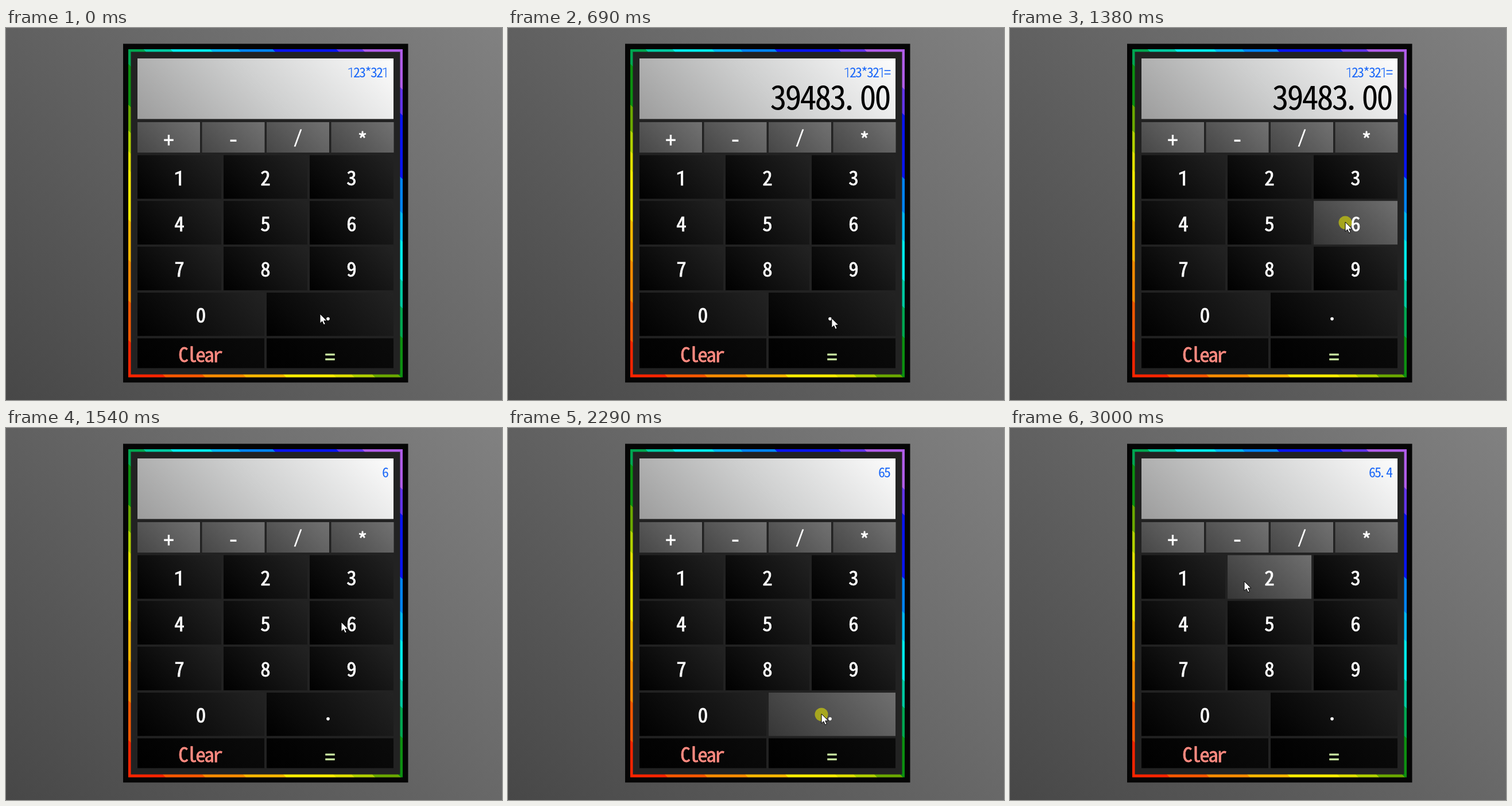
Animation, 864 px wide and 648 px high, one loop 3.06 s. Source, as an HTML page with a canvas:

```html
<!DOCTYPE html>
<html lang="en">
<head>
<meta charset="utf-8">
<title>Calculator</title>
<style>
  html, body { margin: 0; width: 100%; height: 100%; overflow: hidden; background: #666; }
  canvas { display: block; }
</style>
</head>
<body>
<canvas id="stage" width="864" height="648"></canvas>
<script>
const ctx = document.getElementById('stage').getContext('2d');
const LOOP = 3060, STEP = 76.4, LAST = 39;

const MONO = '"Noto Sans Mono CJK JP", "Noto Sans CJK JP", "Noto Sans Mono", monospace';
const PLAIN = 'Roboto, "Liberation Sans", sans-serif'; // has a 1 without a foot

const RAINBOW = [
  [0, '#ff2400'], [.062, '#ff5800'], [.128, '#ff8c00'], [.195, '#ffb800'],
  [.262, '#ffee00'], [.345, '#e0e000'], [.375, '#b0d000'], [.41, '#6aa800'],
  [.453, '#0c8f10'], [.52, '#00a550'], [.57, '#00c8a0'], [.615, '#00ecec'],
  [.68, '#00b8ff'], [.727, '#0084ff'], [.784, '#0814ff'], [.89, '#6234ea'],
  [.933, '#b05ce8']
];

// Keys: label, box, label centre offset from the box centre, font size, kind
const keys = [];
const addKey = (label, x, y, w, h, kind, dx = 0, dy = 2, size = 35) =>
  keys.push({ label, x, y, w, h, kind, dx, dy, size });

[['+', 5, 35], ['-', 5.5, 35], ['/', 1.5, 30], ['*', -4.5, 35]].forEach(([label, dy, size], i) =>
  addKey(label, 229 + i * 112.5, 164, 109, 53, 'op', 0, dy, size));
for (let i = 0; i < 9; i++)
  addKey(String(i + 1), 229 + i % 3 * 150, 221.5 + Math.floor(i / 3) * 79.7, 146, 76, 'digit');
addKey('0', 229, 461, 221, 75.5, 'digit');
addKey('.', 454, 461, 221, 75.5, 'digit', -3.5, 8);
addKey('Clear', 229, 540.5, 221, 52, 'clear');
addKey('=', 454, 540.5, 221, 52, 'equals', 0, 6.5);

const SHADES = {
  op: ['#464646', '#727272'], digit: ['#000', '#232323'],
  clear: ['#000', '#0b0b0b'], equals: ['#000', '#0b0b0b'], down: ['#363636', '#707070']
};
const INKS = { op: '#fff', digit: '#fff', clear: '#ff8a80', equals: '#c8e6a0' };

// Pointer stops: step, x, y
const path = [
  [0, 547, 498], [4, 560, 567], [7, 560, 567], [13, 575, 330], [14, 575, 330],
  [17, 584, 338], [20, 584, 338], [23, 462, 348], [24, 462, 348], [26, 471, 438],
  [28, 546, 498], [30, 546, 498], [34, 362, 314], [36, 340, 322], [37, 340, 322], [39, 408, 267]
];
const presses = [[4, '='], [17, '6'], [23, '5'], [28, '.'], [35, '4'], [39, '2']];
const screens = [
  [0, '123*321', ''], [6, '123*321=', '39483.00'], [19, '6', ''],
  [25, '65', ''], [30, '65.', ''], [37, '65.4', '']
];

// Fill for a box, running from its lower left to its upper right at 45 degrees
function diagonal(x, y, w, h, stops) {
  const cx = x + w / 2, cy = y + h / 2, r = (w + h) / 4;
  const g = ctx.createLinearGradient(cx - r, cy + r, cx + r, cy - r);
  stops.forEach(([at, colour]) => g.addColorStop(at, colour));
  return g;
}

function box(x, y, w, h, fill) {
  ctx.fillStyle = Array.isArray(fill)
    ? diagonal(x, y, w, h, fill.map((c, i) => [i / (fill.length - 1), c])) : fill;
  ctx.fillRect(x, y, w, h);
}

function setFont(ch, size, weight) {
  ctx.font = `${weight} ${size}px ${ch === '1' ? PLAIN : MONO}`;
}

// One character per fixed cell, the last cell ending at `right`
function cells(text, right, baseline, advance, size, weight, bold = 0) {
  [...text].forEach((ch, i) => {
    setFont(ch, size, weight);
    const shift = ch === '.' ? -.25 : 0;
    const x = right - (text.length - i - .5 - shift) * advance;
    ctx.fillText(ch, x, baseline);
    if (bold) {
      ctx.lineWidth = bold;
      ctx.strokeText(ch, x, baseline);
    }
  });
}

function drawKey(key, down) {
  const { label, x, y, w, h, kind, dx, dy, size } = key;
  box(x, y, w, h, SHADES[down ? 'down' : kind]);
  ctx.fillStyle = ctx.strokeStyle = INKS[kind];
  const cx = x + w / 2 + dx;
  if (label.length > 1) return cells(label, cx + 37, 582, 15, size, 400, .8);
  setFont(label, size, 400);
  const m = ctx.measureText(label);
  const baseline = y + h / 2 + dy + (m.actualBoundingBoxAscent - m.actualBoundingBoxDescent) / 2;
  cells(label, cx + (label === '.' ? 11.25 : 7.5), baseline, 15, size, 400, .8);
}

function pointerAt(n) {
  const i = Math.max(1, path.findIndex(p => p[0] >= n));
  const [a, ax, ay] = path[i - 1], [b, bx, by] = path[i];
  const u = (n - a) / (b - a), e = u * u * (3 - 2 * u);
  return [ax + (bx - ax) * e, ay + (by - ay) * e];
}

const arrow = new Path2D('M0 0V16.5L3.8 13L6.5 19L9.3 17.8L6.7 12H12Z');

function drawPointer(x, y) {
  ctx.save();
  ctx.translate(x, y);
  ctx.fillStyle = '#fff';
  ctx.strokeStyle = '#000';
  ctx.lineWidth = 1;
  ctx.fill(arrow);
  ctx.stroke(arrow);
  ctx.restore();
}

function draw(n) {
  box(0, 0, 864, 648, ['#474747', '#818181']);
  box(204, 27.5, 496.5, 590, '#050505');
  const bands = RAINBOW.flatMap(([at, c], i) => [[at, c], [i + 1 < RAINBOW.length ? RAINBOW[i + 1][0] : 1, c]]);
  box(213, 37, 478, 571.5, diagonal(213, 37, 478, 571.5, bands));
  box(217.5, 41.5, 469, 562, '#222');
  box(229, 53, 446, 105.5, ['#9c9c9c', '#cfd0d0', '#fdfdfd']);

  const [, entry, result] = screens.filter(s => s[0] <= n).pop();
  ctx.textAlign = 'center';
  ctx.fillStyle = '#1b68f8';
  cells(entry, 666, 86, 10, 24, 300);
  ctx.fillStyle = '#000';
  cells(result, 666, 142, 26, 58, 300);

  const press = presses.find(p => n >= p[0] && n < p[0] + 2);
  keys.forEach(key => drawKey(key, press && press[1] === key.label));

  const [x, y] = pointerAt(n);
  if (press && n > press[0]) {
    ctx.fillStyle = 'rgba(225, 225, 0, .6)';
    ctx.beginPath();
    ctx.arc(x, y + 1, 11.5, 0, Math.PI * 2);
    ctx.fill();
  }
  drawPointer(x, y);
}

const start = performance.now();
function tick() {
  const t = (performance.now() - start) % LOOP;
  draw(Math.min(LAST, Math.floor(t / STEP)));
  requestAnimationFrame(tick);
}
tick();
</script>
</body>
</html>
```
